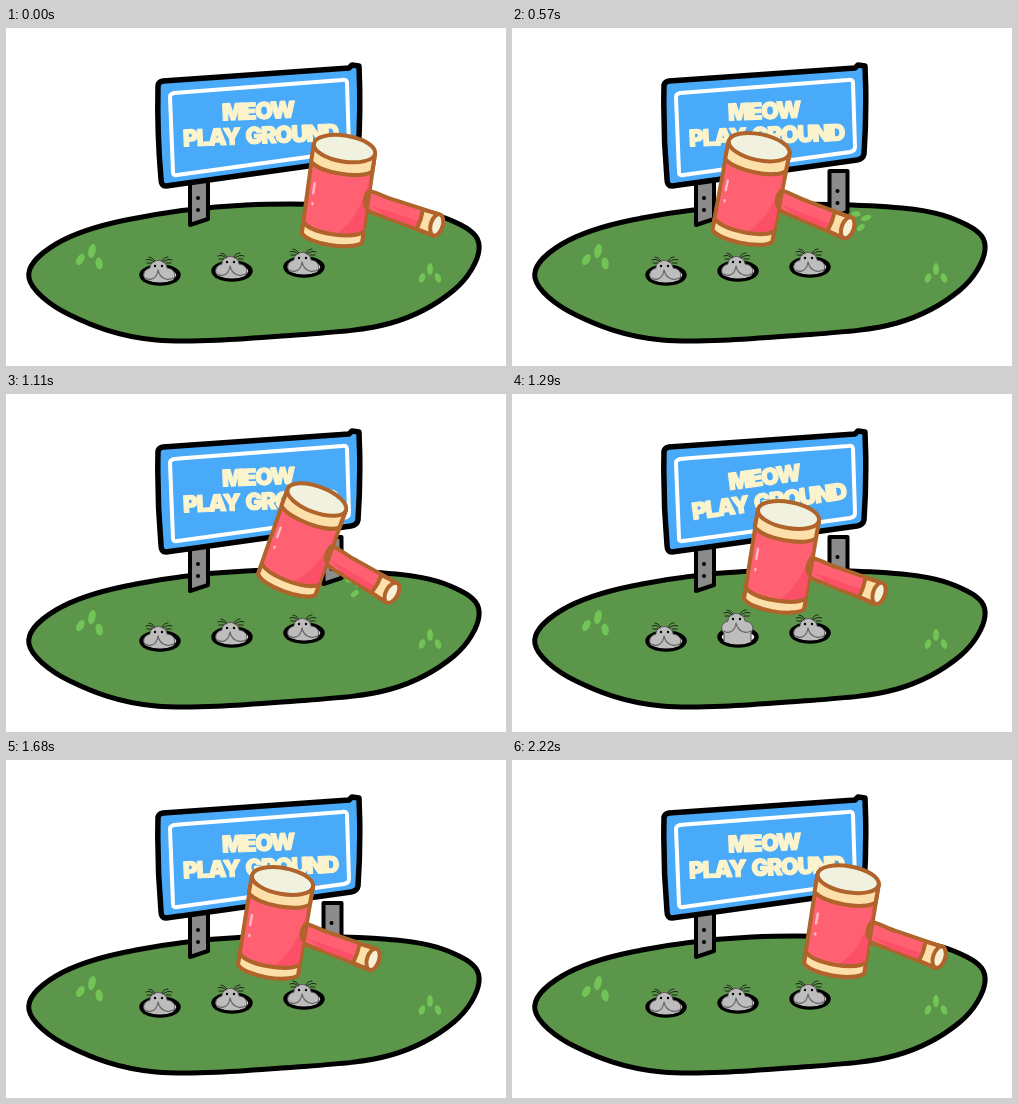
Write an HTML page that moves like this. It is 500 px wide and 338 px high and loops after 2250 ms.

```html
<!DOCTYPE html>
<html lang="en">
<head>
<meta charset="utf-8">
<title>Meow Play Ground</title>
<style>
html, body { margin: 0; width: 100%; height: 100%; overflow: hidden; background: #fff; }
svg { display: block; width: 100vw; height: 100vh; }
text { font: 900 23px Inter, "Open Sans", sans-serif; letter-spacing: -1.5px; word-spacing: 3px; text-anchor: middle; }
</style>
</head>
<body>
<svg viewBox="0 0 500 338" stroke-linejoin="round" stroke-linecap="round">
  <defs>
    <clipPath id="pit"><path d="M-40-60H40V0H17.5A17.5 7.5 0 0 1-17.5 0H-40Z"/></clipPath>
    <ellipse id="hole" rx="18.5" ry="8.5" fill="#eee" stroke="#000" stroke-width="4.5"/>
    <g id="mole">
      <path d="M-14 30V5C-18 1-17-5-10-7C-10-17 6-17 7-7C14-6 17-1 13 5V30Z" fill="#bdbdbd" stroke="#555" stroke-width="1"/>
      <path d="M-2-5C-3 4-10 6-14 3M-2-5C0 4 8 6 13 3" fill="none" stroke="#666" stroke-width="1.2"/>
      <circle cx="-5" cy="-9" r="1.2"/><circle cx="2" cy="-9" r="1.2"/>
      <path d="M-6-13Q-10-17-14-15M-5-14Q-8-18-11-18M2-14Q4-18 8-18M3-13Q8-17 12-15M-8-12L-13-12M6-12L11-12" fill="none" stroke="#1c2418"/>
    </g>
    <g id="post">
      <path d="M0-40V7L18 1V-40Z" fill="#8b8b8b" stroke="#000" stroke-width="4"/>
      <circle cx="8" cy="-20" r="2"/><circle cx="8" cy="-8" r="2"/>
    </g>
  </defs>

  <path id="ground" fill="#5c964a" stroke="#000" stroke-width="5"/>
  <g id="grass" fill="#72c456"></g>
  <use href="#post" x="184" y="190"/>
  <use href="#post" x="317.5" y="183"/>
  <path d="M152 58Q152 54 157 53L343 40L346 37L353 38Q355 82 352 126Q351 131 345 132L160 158Q155 158 155 151Q151 105 152 58Z" fill="#49aafa" stroke="#000" stroke-width="5.5"/>
  <path d="M164 69Q164 66 168 65L336 52Q341 51 341 55L343 119Q343 123 338 124L171 147Q167 148 167 144Z" fill="none" stroke="#fff" stroke-width="4"/>

  <g id="words" fill="#fcf4cd" stroke="#fcf4cd" stroke-width="1.2">
    <text x="252.5" y="91">MEOW</text>
    <text x="254" y="115.5">PLAY GROUND</text>
  </g>
  <g id="moles"></g>

  <g id="hammer" stroke="#b0642b" stroke-width="4">
    <path d="M27-10C36-11 47-6 58-5L103 2Q109 5 109 12Q108 22 101 24L54 14C42 12 31 11 27 6Z" fill="#ff6173"/>
    <path d="M33 4L84 12L82 18L54 13Z" fill="#fb5068" stroke="none"/>
    <path d="M87 0L103 2Q109 5 109 12Q108 22 101 24L84 20Q87 10 87 0Z" fill="#fddfa9"/>
    <ellipse cx="103" cy="13" rx="6" ry="11" transform="rotate(8 103 13)" fill="#f8f0d5"/>
    <path d="M-31-48L-29 42C-22 52 23 52 32 42L31-48Z" fill="#ff6173"/>
    <path d="M30-22C26 6 20 24 5 38Q22 38 31 32Z" fill="#fb5068" stroke="none"/>
    <path d="M-31-48V-30C-21-20 22-20 31-30V-48Z" fill="#fddfa9"/>
    <path d="M-29 31C-20 41 22 41 32 31V42C23 52-22 52-29 42Z" fill="#fddfa9"/>
    <ellipse cy="-48" rx="31" ry="13" fill="#f1f1df"/>
    <path d="M-24-9V1M-23 11V12" stroke="#ffb9bf" stroke-width="2.5"/>
    <path d="M30-9Q26-2 30 6" fill="none"/>
  </g>
</svg>
<script>
const LOOP = 2250, STEP = 30;
const get = id => document.getElementById(id);
const clamp = v => Math.max(0, Math.min(1, v));
const place = (el, x, y, turn = 0) =>
  el.setAttribute("transform", `translate(${x} ${y}) rotate(${turn})`);

// closed smooth curve through a few points
function blob(points) {
  const p = i => points[(i + points.length) % points.length];
  const lean = (i, s) => p(i).map((v, k) => v + s * (p(i + 1)[k] - p(i - 1)[k]) / 6);
  return `M${p(0)}` + points.map((_, i) =>
    `C${lean(i, 1)} ${lean(i + 1, -1)} ${p(i + 1)}`).join("") + "Z";
}
get("ground").setAttribute("d", blob([[23, 250], [50, 216], [120, 192], [240, 177],
  [390, 180], [455, 197], [473, 222], [448, 262], [385, 295], [290, 307], [150, 312], [64, 287]]));

// each tuft is a fan of three blades
function tuft(x, y, size, turn) {
  const fan = [-1, 0, 1].map(k =>
    `<ellipse rx="3" ry="${6 - Math.abs(k)}" transform="translate(${8 * k} ${9 * Math.abs(k)}) rotate(${-20 * k})"/>`);
  return `<g transform="translate(${x} ${y}) rotate(${turn}) scale(${size})">${fan.join("")}</g>`;
}
get("grass").innerHTML = tuft(86, 223, 1.2, 12) + tuft(424, 241, 1, 0) + tuft(354, 190, 0.9, 70);

// moles from left to right; the hammer visits left, right, middle
const HIT_GAP = 570;
const moles = [0, 2, 1].map((turn, i) =>
  ({ x: 154 + 72 * i, y: 247 - 4 * i, hit: 330 + HIT_GAP * turn }));
get("moles").innerHTML = moles.map(m =>
  `<g transform="translate(${m.x} ${m.y})"><use href="#hole"/>` +
  `<g clip-path="url(#pit)"><use class="mole" href="#mole"/></g></g>`).join("");
const bodies = document.querySelectorAll(".mole");

const lift = (t, hit) => 9 * Math.min(clamp((t - hit + 330) / 150), clamp((hit + 90 - t) / 90));

// hammer poses: x, y, tilt
const rest = [331, 168, 9], raised = [294, 150.5, 20.5];
const strike = i => [162 + 80 * i, 187 - i, 0];
const swing = [[0, rest], [330, strike(0)], [750, raised], [900, strike(2)],
  [1110, raised], [1470, strike(1)], [1890, raised], [LOOP, rest]];

function pose(t) {
  const i = swing.findIndex(([time]) => time > t);
  const [t0, a] = swing[i - 1], [t1, b] = swing[i];
  return a.map((v, k) => v + (b[k] - v) * (t - t0) / (t1 - t0));
}

function draw(t) {
  place(get("hammer"), ...pose(t));
  moles.forEach((m, i) => place(bodies[i], 0, -lift(t, m.hit)));
  const steep = Math.floor(t / 250) % 2;
  get("words").setAttribute("transform",
    `translate(${steep * 1.5} 0) rotate(${steep ? -7.7 : -2.3} 254 98)`);
}

const start = performance.now();
function tick() {
  const t = (performance.now() - start) % LOOP;
  draw(Math.floor(t / STEP) * STEP);
  requestAnimationFrame(tick);
}
draw(0);
requestAnimationFrame(tick);
</script>
</body>
</html>
```
